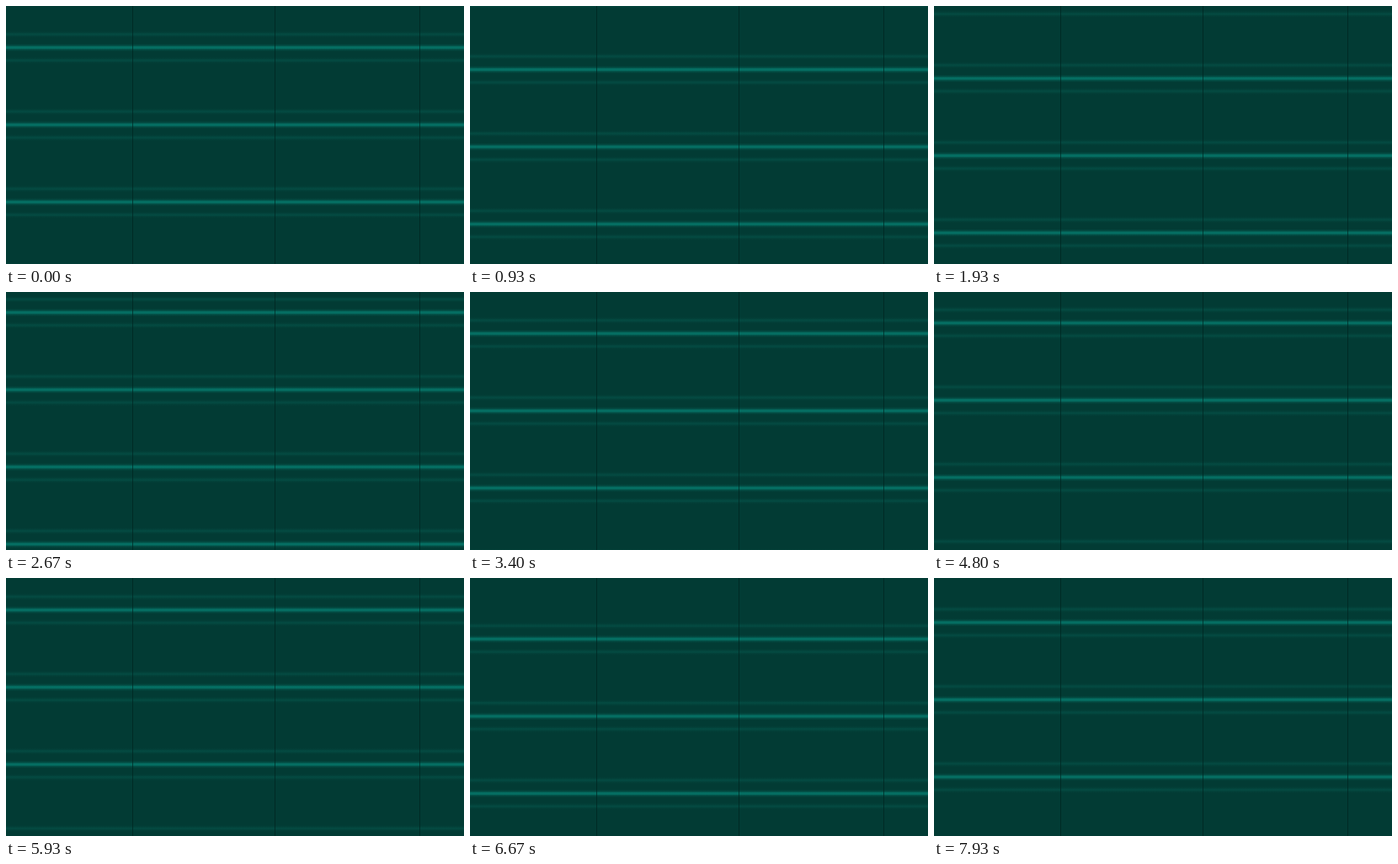
These frames come from a looping animation (544 px wide and 306 px high, 8000 ms). An HTML page with a canvas:

```html
<!DOCTYPE html>
<html lang="en">
<head>
<meta charset="utf-8">
<title>Rolling lines</title>
<style>
  html, body { margin: 0; width: 100%; height: 100%; overflow: hidden; background: #023b34; }
  canvas { display: block; width: 100vw; height: 100vh; }
</style>
</head>
<body>
<canvas width="544" height="306"></canvas>
<script>
const ctx = document.querySelector('canvas').getContext('2d');
const WIDTH = 544, HEIGHT = 306;
const LOOP = 8000, FPS = 15;
const PITCH = 91.6, START = 49.3, CYCLE = 17;
const SEAMS = [150, 319, 491];

// Upward travel in pixels at steps within one roll of the pattern.
const TRAVEL = [[0, 0], [4, 12.8], [6, 25], [9, 38.5], [12, 55], [15, 70.7], [16, 85.9], [17, PITCH]];

function travelAt(phase) {
  const i = TRAVEL.findIndex(([step]) => step > phase);
  const [s0, y0] = TRAVEL[i - 1], [s1, y1] = TRAVEL[i];
  return y0 + (y1 - y0) * (phase - s0) / (s1 - s0);
}

function softLine(y, radius, rgb, strength) {
  const glow = ctx.createLinearGradient(0, y - radius, 0, y + radius);
  const color = alpha => `rgba(${rgb},${alpha * strength})`;
  glow.addColorStop(0, color(0));
  glow.addColorStop(0.25, color(0.35));
  glow.addColorStop(0.4, color(1));
  glow.addColorStop(0.6, color(1));
  glow.addColorStop(0.75, color(0.35));
  glow.addColorStop(1, color(0));
  ctx.fillStyle = glow;
  ctx.fillRect(0, y - radius, WIDTH, radius * 2);
}

function draw(time) {
  const step = Math.floor(time % LOOP * FPS / 1000 + 0.1);
  const drift = 1.15 * Math.max(0, step / CYCLE - 4);
  const top = START - travelAt(step % CYCLE) + drift;

  ctx.fillStyle = '#023b34';
  ctx.fillRect(0, 0, WIDTH, HEIGHT);
  for (let y = top - PITCH; y < HEIGHT + PITCH; y += PITCH) {
    softLine(y - 15.7, 4, '4,76,67', 0.8);
    softLine(y, 4.6, '5,110,98', 1);
    softLine(y + 15.2, 4, '4,76,67', 0.8);
  }
  ctx.fillStyle = 'rgba(1,36,32,0.7)';
  for (const x of SEAMS) ctx.fillRect(x, 0, 1, HEIGHT);
}

function tick() {
  draw(performance.now());
  requestAnimationFrame(tick);
}
tick();
</script>
</body>
</html>
```
